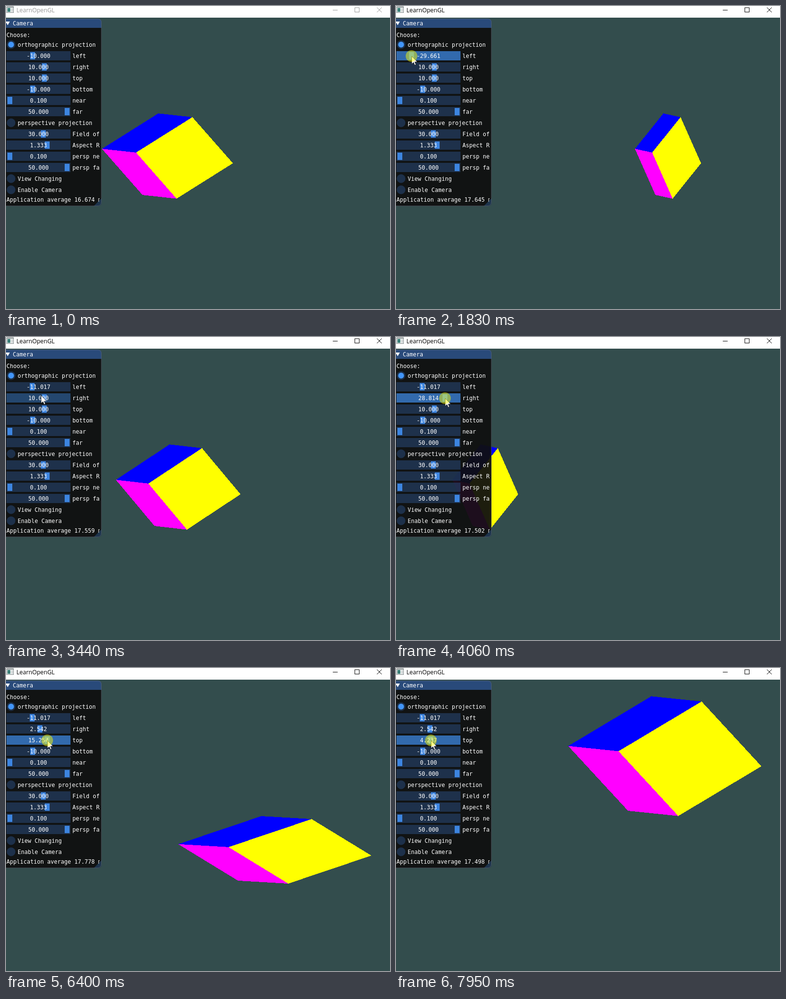
An HTML page with a canvas that plays this animation: 792x624 px, repeating every 8000 ms.

```html
<!DOCTYPE html>
<html lang="en">
<head>
<meta charset="utf-8">
<title>Orthographic camera</title>
<style>
  html, body { margin: 0; width: 100%; height: 100%; overflow: hidden; background: #334d4d; }
  canvas { display: block; }
</style>
</head>
<body>
<canvas id="stage" width="792" height="624"></canvas>
<script>
const ctx = document.getElementById('stage').getContext('2d');
const LOOP = 8000;
const STEP = 77;
const REST = 180;  // pause at every stop, ms
const FRAME = 'rgba(41,74,122,.54)';
const HOVER = 'rgba(66,150,250,.4)';
const ACTIVE = 'rgba(66,150,250,.67)';
const ACCENT = 'rgb(66,150,250)';
const GRAB = 'rgb(61,133,224)';

// Panel rows are evenly spaced; sliders carry a value and a grab position 0..1
const FIRST_ROW = 80, ROW_GAP = 23;
const ITEMS = [
  { radio: 'orthographic projection', on: true },
  { name: 'left', value: -10 },
  { name: 'right', value: 10 },
  { name: 'top', value: 10 },
  { name: 'bottom', value: -10 },
  { name: 'near', value: .1, pos: 0 },
  { name: 'far', value: 50, pos: 1 },
  { radio: 'perspective projection' },
  { name: 'Field of View', value: 30, pos: .585 },
  { name: 'Aspect Ratio', value: 1.333, pos: .653 },
  { name: 'persp near', value: .1, pos: 0 },
  { name: 'persp far', value: 50, pos: 1 },
  { radio: 'View Changing' },
  { radio: 'Enable Camera' }
];
const rowY = i => FIRST_ROW + ROW_GAP * i;

// Pointer stops per dragged row: arrival time, x
const DRAGS = [
  { row: 1, stops: [[830, 53], [1750, 32], [2580, 49], [2990, 54]] },
  { row: 2, stops: [[3500, 79], [3980, 101], [5070, 70]] },
  { row: 3, stops: [[6080, 79], [6670, 103], [6930, 99], [7560, 72], [7900, 72]] }
];
for (const d of DRAGS) {
  d.press = d.stops[0][0] + 80;
  d.release = d.stops[d.stops.length - 1][0] + REST - 10;
}
const PATH = [
  [-REST + STEP, 404, 523],
  ...DRAGS.flatMap(d => d.stops.map(([t, x]) => [t, x, rowY(d.row)]))
];

// Average frame time: arrival time, ms
const TIMING = [
  [0, 16.674], [1750, 17.645], [2580, 17.622], [3980, 17.502],
  [5070, 17.78], [6930, 17.777], [7870, 17.498]
];

// Rests at each stop, then eases to the next
function glide(stops, t, col) {
  const next = stops.findIndex(s => s[0] > t);
  if (next < 0) return stops[stops.length - 1][col];
  const a = stops[Math.max(0, next - 1)], b = stops[next];
  const p = Math.max(0, (t - a[0] - REST) / (b[0] - a[0] - REST));
  return a[col] + (b[col] - a[col]) * p * p * (3 - 2 * p);
}

const pointer = t => ({ x: Math.round(glide(PATH, t, 1)), y: Math.round(glide(PATH, t, 2)) });

function sliderValues(t) {
  const values = ITEMS.map(item => item.value);
  for (const { row, press, release } of DRAGS) {
    if (t >= press) values[row] = (pointer(Math.min(t, release)).x - 8) / 118 * 100 - 50;
  }
  return values;
}

function rect(x, y, w, h, color) {
  ctx.fillStyle = color;
  ctx.fillRect(x, y, w, h);
}

function poly(points, color) {
  ctx.beginPath();
  for (const [x, y] of points) ctx.lineTo(x, y);
  ctx.closePath();
  ctx.fillStyle = color;
  ctx.fill();
}

function disc(x, y, r, color) {
  ctx.beginPath();
  ctx.arc(x, y, r, 0, Math.PI * 2);
  ctx.fillStyle = color;
  ctx.fill();
}

function label(text, x, y, align = 'left') {
  ctx.font = '11.63px "DejaVu Sans Mono", monospace';
  ctx.textAlign = align;
  ctx.fillStyle = '#fff';
  ctx.fillText(text, x, y);
}

// Fills a convex shape row by row, with hard edges
function rasterFill(points, color) {
  const ys = points.map(p => p[1]);
  const bottom = Math.max(...ys);
  for (let y = Math.round(Math.min(...ys)); y + .5 < bottom; y++) {
    const cuts = [];
    points.forEach(([x1, y1], i) => {
      const [x2, y2] = points[(i + 1) % points.length];
      const mid = y + .5;
      if ((y1 <= mid) !== (y2 <= mid)) cuts.push(x1 + (x2 - x1) * (mid - y1) / (y2 - y1));
    });
    if (cuts.length < 2) continue;
    const left = Math.round(Math.min(...cuts));
    rect(left, y, Math.round(Math.max(...cuts)) - left, 1, color);
  }
}

function drawCube([, left, right, top, bottom]) {
  const corner = [-3.12, .74];
  const u = [2.905, 2.43], v = [2.09, -3.165], w = [-1.758, .255];
  const project = ([x, y]) => [
    -7 + 800 * (x - left) / (right - left),
    24 + 600 * (top - y) / (top - bottom)
  ];
  const add = (a, b) => [a[0] + b[0], a[1] + b[1]];
  const face = (a, b, color) => {
    const quad = [corner, add(corner, a), add(add(corner, a), b), add(corner, b)];
    rasterFill(quad.map(project), color);
  };
  face(v, w, '#f0f');
  face(u, w, '#00f');
  face(u, v, '#ff0');
}

function drawTitleBar(focused) {
  const ink = focused ? '#000' : '#999';
  rect(0, 0, 792, 24, '#fff');
  rect(1, 1, 15, 13, '#7d8587');
  rect(2, 3, 13, 10, '#f4f6f6');
  rect(3, 4, 6, 8, '#3b7f78');
  rect(11, 4, 3, 8, '#cdd3d4');
  ctx.font = '12.2px "Open Sans", "Noto Sans", sans-serif';
  ctx.textAlign = 'left';
  ctx.fillStyle = ink;
  ctx.fillText('LearnOpenGL', 21.5, 13);
  rect(674, 8, 10, 1, ink);
  ctx.strokeStyle = ink;
  ctx.lineWidth = 1;
  ctx.strokeRect(719.5, 3.5, 9, 9);
  ctx.beginPath();
  ctx.moveTo(765, 3);
  ctx.lineTo(775, 13);
  ctx.moveTo(775, 3);
  ctx.lineTo(765, 13);
  ctx.stroke();
}

function drawRadio({ radio, on }, y) {
  disc(10.5, y - .5, 9, FRAME);
  if (on) disc(10.5, y - .5, 6, ACCENT);
  label(radio, 24, y + 4);
}

function drawSlider({ name, pos }, y, value, active, hovered) {
  const share = pos ?? (value + 50) / 100;
  rect(1, y - 10, 132, 19, active ? ACTIVE : hovered ? HOVER : FRAME);
  rect(Math.round(3 + share * 118), y - 8, 10, 15, active ? ACCENT : GRAB);
  label(value.toFixed(3), 67, y + 4, 'center');
  label(name, 137, y + 4);
}

function drawPanel(t, values, drag, p) {
  ctx.save();
  ctx.beginPath();
  ctx.roundRect(-7, 26, 204, 386, 7);
  ctx.clip();
  rect(-7, 45, 204, 367, 'rgba(15,15,15,.94)');
  rect(-7, 26, 204, 19, 'rgb(41,74,122)');
  poly([[197, 396], [197, 412], [181, 412]], 'rgba(66,150,250,.25)');
  ctx.restore();

  ctx.beginPath();
  ctx.roundRect(-6.5, 26.5, 203, 385, 7);
  ctx.strokeStyle = 'rgba(110,110,128,.5)';
  ctx.lineWidth = 1;
  ctx.stroke();

  poly([[-1, 32], [8, 32], [3.5, 39.5]], '#fff');
  label('Camera', 14, 40);

  ctx.save();
  ctx.beginPath();
  ctx.rect(0, 45, 193, 367);
  ctx.clip();
  label('Choose:', 1, 64);
  ITEMS.forEach((item, i) => {
    const y = rowY(i);
    if (item.radio) return drawRadio(item, y);
    const over = t >= DRAGS[0].press && !drag && p.x < 133 && Math.abs(p.y - y) < 10;
    drawSlider(item, y, values[i], drag?.row === i, over);
  });
  label(`Application average ${glide(TIMING, t, 1).toFixed(3)} ms/frame`, 1, 403);
  ctx.restore();
}

function drawPointer({ x, y }, pressed) {
  ctx.save();
  ctx.translate(x + .5, y + .5);
  poly([[0, 0], [0, 16], [3.7, 12.6], [6.2, 18.3], [8.6, 17.2], [6.2, 11.7], [11.3, 11.5]], '#fff');
  ctx.strokeStyle = '#222';
  ctx.lineWidth = .8;
  ctx.stroke();
  ctx.restore();
  if (pressed) disc(x, y, 12, 'rgba(255,255,0,.47)');
}

function draw(t) {
  const values = sliderValues(t);
  const p = pointer(t);
  const drag = DRAGS.find(d => t >= d.press && t < d.release);
  rect(0, 0, 792, 624, '#334d4d');
  drawCube(values);
  drawTitleBar(t >= DRAGS[0].press);
  drawPanel(t, values, drag, p);
  if (t >= STEP) drawPointer(p, !!drag);
}

const began = performance.now();
function tick() {
  const t = (performance.now() - began) % LOOP;
  draw(Math.floor(t / STEP) * STEP);
  requestAnimationFrame(tick);
}
tick();
</script>
</body>
</html>
```
